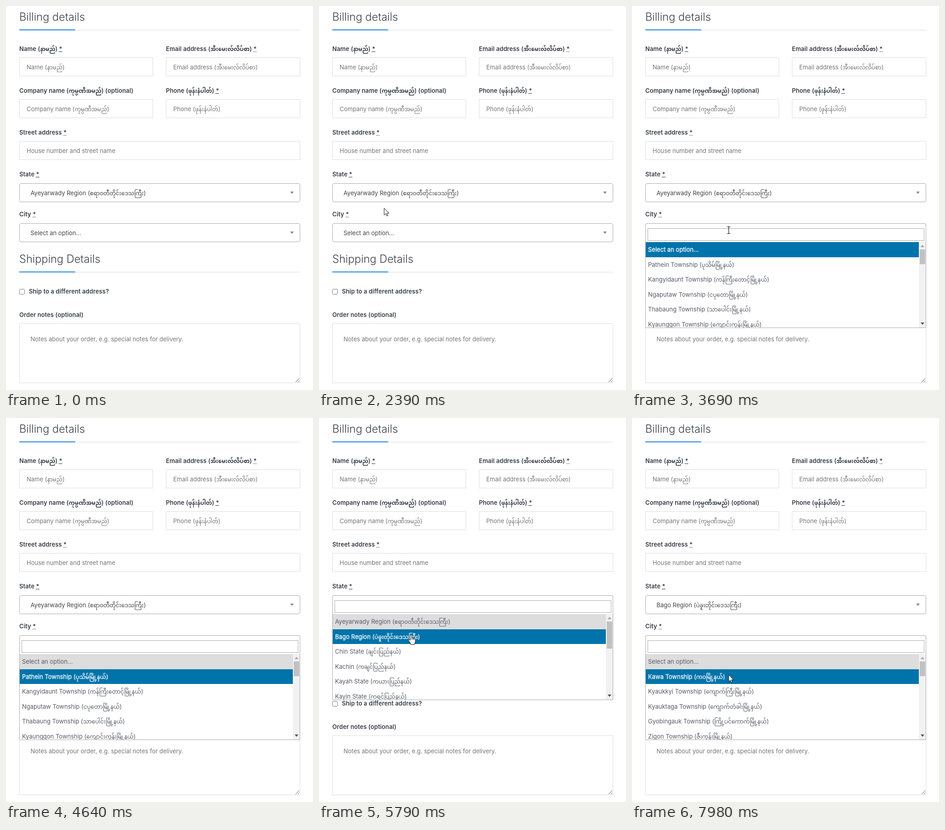
An HTML page that plays this animation: 670 px wide and 836 px high, repeating every 8 s.

```html
<!DOCTYPE html>
<html lang="en">
<head>
<meta charset="utf-8">
<title>Checkout form</title>
<style>
  html, body { margin: 0; width: 100%; height: 100%; overflow: hidden; background: #fff; }
  #stage { position: relative; width: 670px; height: 836px; overflow: hidden; font: 13px/20px Inter, "Noto Sans Myanmar", "Noto Sans", sans-serif; color: #444; }
  #stage * { box-sizing: border-box; }
  #stage div, #stage svg { position: absolute; white-space: nowrap; }
  #stage i { font-style: normal; font-size: 12px; line-height: 1; letter-spacing: 0; }
  .head { font-size: 23.6px; font-weight: 300; color: #3a414c; }
  .label { font-weight: 600; letter-spacing: .09px; color: #363d47; }
  .label abbr { text-decoration: underline dotted; border-bottom: 1px dotted #555; line-height: 12px; display: inline-block; }
  .hint { color: #757575; }
  .field { border: 1px solid #ddd; background: #fff; }
  .select { border: 1px solid #aaa; border-radius: 4px; background: #fff; }
  .drop { border: 1px solid #aaa; border-radius: 4px 4px 0 0; background: #fff; }
  .search { border: 1px solid #aaa; }
  .list { overflow: hidden; }
  .item { color: #555b66; line-height: 32.5px; padding-left: 5px; }
  .item.chosen { background: #ddd; }
  .item.hot { background: #0073aa; color: #fff; -webkit-text-stroke: .3px #fff; }
</style>
</head>
<body>
<div id="stage"></div>
<script>
const stage = document.getElementById('stage');

// Burmese runs are set slightly smaller than the Latin text
const mixed = s => s.replace(/[\u1000-\u109f]+/g, '<i>$&</i>');

function box(x, y, w, h, cls = '', css = '', parent = stage) {
  const el = document.createElement('div');
  el.className = cls;
  el.style.cssText = `left:${x}px;top:${y}px;width:${w}px;height:${h}px;${css}`;
  parent.append(el);
  return el;
}
function text(x, mid, words, cls = '') {
  const el = box(x, mid - 10, 500, 20, cls);
  el.innerHTML = mixed(words);
  return el;
}
function svg(x, y, w, h, inner, parent = stage) {
  const el = box(x, y, w, h, '', '', parent);
  el.innerHTML = `<svg width="${w}" height="${h}" style="overflow:visible">${inner}</svg>`;
  return el;
}
const triangle = (x, y, dir, color, parent) =>
  svg(x, y, 8, 5, `<path d="${dir > 0 ? 'M0 0H8L4 5Z' : 'M0 5H8L4 0Z'}" fill="${color}"/>`, parent);

function heading(mid, words) {
  text(29, mid, words, 'head');
  box(29, mid + 28, 613, 1, '', 'background:#ddd');
  box(29, mid + 27, 122, 2, '', 'background:#1e88e5');
}
function field(x, y, w, name, hint, extra = ' <abbr>*</abbr>') {
  text(x, y - 19, name + extra, 'label');
  box(x, y, w, 41, 'field');
  text(x + 16, y + 21, hint, 'hint');
}
function select(y, name) {
  text(29, y - 20, name + ' <abbr>*</abbr>', 'label');
  box(29, y, 613, 41, 'select');
  triangle(619.5, y + 18, 1, '#888');
  return text(53.5, y + 21, '');
}

heading(24, 'Billing details');
for (const [x, y, name, extra] of [
  [29, 112, 'Name (နာမည်)'],
  [349, 112, 'Email address (အီးမေးလ်လိပ်စာ)'],
  [29, 203, 'Company name (ကုမ္ပဏီအမည်)', ' (optional)'],
  [349, 203, 'Phone (ဖုန်းနံပါတ်)']
]) field(x, y, x < 300 ? 292 : 293, name, name, extra);
field(29, 294, 613, 'Street address', 'House number and street name');
const stateText = select(386, 'State');
const cityText = select(473, 'City');
heading(551, 'Shipping Details');
box(29, 616, 12, 12, '', 'border:1px solid #767676;border-radius:2.5px');
text(50, 621, 'Ship to a different address?', 'label');
text(29, 672, 'Order notes (optional)', 'label');
box(29, 691, 613, 130, 'field');
text(53.5, 725, 'Notes about your order, e.g. special notes for delivery.', 'hint');
svg(632, 811, 9, 9, '<path d="M0 8L8 0M5 8L8 5" stroke="#555" fill="none"/>');

function dropdown(y, thumb, items) {
  const el = box(29, y, 613, 228, 'drop');
  box(4, 10, 604, 27, 'search', '', el);
  const list = box(0, 40, 611, 186, 'list', '', el);
  const rows = items.map((name, i) => {
    const row = box(0, i * 32.5, 596, 32.5, 'item', '', list);
    row.innerHTML = mixed(name);
    return row;
  });
  box(596, 0, 15, 186, '', 'background:#f1f1f1', list);
  box(598, 16, 12, thumb, '', 'background:#c1c1c1', list);
  triangle(600, 6, -1, '#a3a3a3', list);
  triangle(600, 175, 1, '#505050', list);
  return { el, rows };
}
const none = 'Select an option...';
const states = ['Ayeyarwady Region (ဧရာဝတီတိုင်းဒေသကြီး)', 'Bago Region (ပဲခူးတိုင်းဒေသကြီး)', 'Chin State (ချင်းပြည်နယ်)',
  'Kachin (ကချင်ပြည်နယ်)', 'Kayah State (ကယားပြည်နယ်)', 'Kayin State (ကရင်ပြည်နယ်)'];
const delta = [none, 'Pathein Township (ပုသိမ်မြို့နယ်)', 'Kangyidaunt Township (ကန်ကြီးတောင့်မြို့နယ်)', 'Ngaputaw Township (ငပုတောမြို့နယ်)',
  'Thabaung Township (သာပေါင်းမြို့နယ်)', 'Kyaunggon Township (ကျောင်းကုန်းမြို့နယ်)'];
const bago = [none, 'Kawa Township (ကဝမြို့နယ်)', 'Kyaukkyi Township (ကျောက်ကြီးမြို့နယ်)', 'Kyauktaga Township (ကျောက်တံခါးမြို့နယ်)',
  'Gyobingauk Township (ကြို့ပင်ကောက်မြို့နယ်)', 'Zigon Township (ဇီးကုန်းမြို့နယ်)'];
const drops = [dropdown(386, 59, states), dropdown(473, 32, delta), dropdown(473, 32, bago)];

// Dark ring shown while the first list opens
const ring = svg(29, 386, 613, 8, '<path d="M0 7V4Q0 1 4 1H609Q613 1 613 4V7" fill="none" stroke="#111" stroke-width="2"/>');

const glow = svg(0, 0, 1, 1, '<circle r="11" fill="#f2ea3c" opacity=".75"/>');
const ink = 'fill="#fff" stroke="#111" stroke-linejoin="round"';
const cursors = {
  arrow: svg(0, 0, 1, 1, `<path ${ink} d="M0 0V15L3.5 11.8L5.9 17.2L8.2 16.2L5.9 11H10.6Z"/>`),
  hand: svg(0, 0, 1, 1, `<path ${ink} d="M-2 1.5C-2-.5 1.5-.5 1.5 1.5V7C2 6 4.5 6.3 4.5 8C5 7 7 7.2 7 9C8 8.2 9.3 9 9.3 10.5V14C9.3 17 7.5 18 7.5 21H-1C-1 18-5 14-5.8 11.5C-6.3 9.5-4 9-2 12ZM1.5 7V11M4.5 8V11M7 9V11"/>`),
  beam: svg(0, 0, 1, 1, '<path d="M-3.5-7.5H-1L0-6.5L1-7.5H3.5M-3.5 7.5H-1L0 6.5L1 7.5H3.5M0-6.5V6.5" fill="none" stroke="#111" stroke-width="1.2"/>')
};

// Pointer moves: start, end, from, to
const moves = [
  [160, 540, 405, -10, 35, 218], [910, 1170, -8, 306, 132, 388], [1740, 2010, 132, 388, 142, 440],
  [2370, 3110, 142, 440, 211, 487], [3690, 4150, 211, 488, 176, 553], [4800, 5300, 176, 553, 205, 404],
  [5440, 5590, 205, 404, 205, 428], [5610, 5790, 205, 428, 201, 472], [6430, 6700, 201, 472, 211, 487], [6860, 7210, 211, 487, 211, 559]
];
// Step tracks: [time, value] holds until the next entry
const shape = [[0, ''], [160, 'arrow'], [540, ''], [910, 'arrow'], [1140, 'hand'], [2330, 'arrow'], [2960, 'hand'], [3430, 'beam'], [3960, 'hand'],
  [4370, ''], [4800, 'arrow'], [5180, 'hand'], [6190, 'arrow'], [6470, 'hand'], [6780, 'beam'], [7060, 'hand'], [7240, 'arrow']];
const opened = [[0, -1], [1420, 0], [2330, -1], [3410, 1], [4660, -1], [5420, 0], [6150, -1], [6780, 2]];
const hot = [[0, 0], [3980, 1], [4800, 0], [5680, 1], [6300, 0], [7080, 1]];
const clicks = [[1360, 1600], [2310, 2360], [3390, 3450], [5380, 5460], [6130, 6240], [6740, 6840], [7880, 7980]];

const at = (track, t) => track.findLast(k => k[0] <= t)[1];
const during = (t, [a, b]) => t >= a && t < b;
const show = (el, on) => el.style.display = on ? '' : 'none';
const put = (el, x, y) => el.style.transform = `translate(${x}px,${y}px)`;

function pointer(t) {
  const [a, b, x, y, u, v] = moves.findLast(m => m[0] <= t) || moves[0];
  const p = Math.min(1, Math.max(0, (t - a) / (b - a)));
  const e = p * p * (3 - 2 * p);
  return [x + (u - x) * e, y + (v - y) * e];
}

function draw(t) {
  const open = at(opened, t), row = at(hot, t);
  stateText.innerHTML = mixed(states[t < 6150 ? 0 : 1]);
  cityText.innerHTML = mixed(during(t, [4660, 6150]) ? delta[1] : none);
  drops.forEach(({ el, rows }, i) => {
    show(el, i === open);
    rows.forEach((r, j) => r.className = 'item' + (j === row ? ' hot' : j === 0 ? ' chosen' : ''));
  });
  show(ring, during(t, [1420, 1640]));
  const [x, y] = pointer(t);
  show(glow, clicks.some(c => during(t, c)));
  put(glow, x, y);
  for (const name in cursors) {
    show(cursors[name], name === at(shape, t));
    put(cursors[name], x, y);
  }
}

function tick(now) {
  draw(now % 8000);
  requestAnimationFrame(tick);
}
draw(0);
requestAnimationFrame(tick);
</script>
</body>
</html>
```
